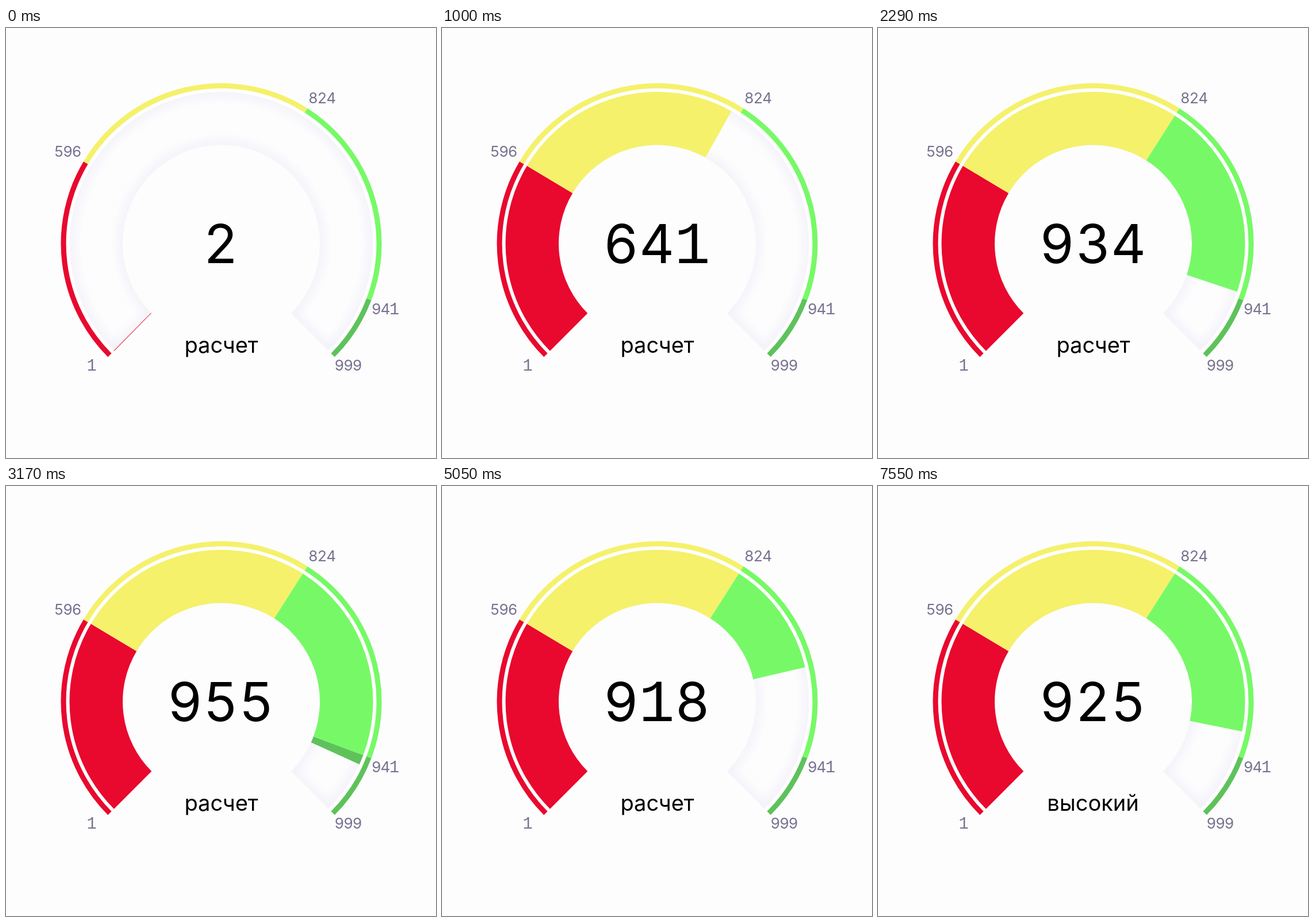
Animation, 748 px wide and 748 px high, one loop 7.59 s. Source, as an HTML page:

```html
<!DOCTYPE html>
<html lang="ru">
<head>
<meta charset="utf-8">
<title>Gauge</title>
<style>
  html, body { margin: 0; width: 100%; height: 100%; overflow: hidden; background: #fdfdfd; }
  svg { display: block; width: 748px; height: 748px; }
  text { font-family: Inter, "Noto Sans", sans-serif; text-anchor: middle; }
  .footed { font-family: "Liberation Mono", monospace; }
  .mark { fill: #77728f; }
  .status { font-size: 38px; }
</style>
</head>
<body>
<svg viewBox="0 0 748 748">
  <defs>
    <filter id="soft" x="-10%" y="-10%" width="120%" height="120%">
      <feGaussianBlur stdDeviation="9"/>
    </filter>
    <clipPath id="inside"><path class="band"/></clipPath>
  </defs>
  <path class="band" fill="#fdfdfe"/>
  <g clip-path="url(#inside)">
    <path class="band" fill="none" stroke="#ebebf7" stroke-width="11" filter="url(#soft)"/>
  </g>
  <g id="arcs" fill="none"></g>
  <g id="marks"></g>
  <text id="value"></text>
  <text id="busy" class="status" x="374.5" y="564.5">расчет</text>
  <text id="done" class="status" x="374" y="564.5">высокий</text>
</svg>
<script>
const LOOP = 7590, CX = 374.5, CY = 375, START = -135, END = 135;
const INNER = 171.5, OUTER = 264;
const zones = [
  { from: START, to: -59.2, color: '#e9082e' },
  { from: -59.2, to: 32.5, color: '#f5f16b' },
  { from: 32.5, to: 110.7, color: '#77f967' },
  { from: 110.7, to: END, color: '#5ec25b' }
];
const marks = [['1', 149, 596], ['596', 107.5, 224], ['824', 550, 131], ['941', 660, 498], ['999', 595.5, 596]];

const $ = id => document.getElementById(id);

function add(parent, name, attrs) {
  const node = document.createElementNS('http://www.w3.org/2000/svg', name);
  for (const key in attrs) node.setAttribute(key, attrs[key]);
  return parent.appendChild(node);
}

// Angles are in degrees, clockwise from the top.
function point(r, deg) {
  const a = deg * Math.PI / 180;
  return `${(CX + r * Math.sin(a)).toFixed(2)} ${(CY - r * Math.cos(a)).toFixed(2)}`;
}

function arc(r, from, to) {
  const large = Math.abs(to - from) > 180 ? 1 : 0;
  return `${point(r, from)} A${r} ${r} 0 ${large} ${to > from ? 1 : 0} ${point(r, to)}`;
}

// Evenly spaced digits; the one has a foot.
function setDigits(node, str, x, y, size, step) {
  node.textContent = '';
  [...str].forEach((digit, i) => {
    const footed = digit === '1';
    const part = add(node, 'tspan', {
      x: x + (i - (str.length - 1) / 2) * step, y,
      'font-size': footed ? size * 1.1 : size,
      class: footed ? 'footed' : ''
    });
    part.textContent = digit;
  });
}

const clamp = p => Math.min(1, Math.max(0, p));
const ramp = (t, a, b) => clamp((t - a) / (b - a));
const swing = (t, a, b) => (1 - Math.cos(Math.PI * ramp(t, a, b))) / 2;
const rise = (t, power) => 1 - (1 - ramp(t, 0, 3100)) ** power;

const needleAt = t => START + 249.7 * rise(t, 2.75) - 46 * swing(t, 3100, 4618) + 32.65 * swing(t, 4618, 5911);
const valueAt = t => Math.round(1 + 954 * rise(t, 2.85) - 40 * swing(t, 3720, 4900) + 10 * swing(t, 4900, 5320));

const band = `M${arc(OUTER, START, END)} L${arc(INNER, END, START)} Z`;
document.querySelectorAll('.band').forEach(path => path.setAttribute('d', band));

add($('arcs'), 'path', { d: 'M' + arc(267, START, END), stroke: '#fff', 'stroke-width': 6 });
for (const zone of zones) {
  add($('arcs'), 'path', { d: 'M' + arc(274.5, zone.from, zone.to), stroke: zone.color, 'stroke-width': 9 });
  zone.fill = add($('arcs'), 'path', { stroke: zone.color, 'stroke-width': OUTER - INNER });
}
for (const [str, x, y] of marks) {
  setDigits(add($('marks'), 'text', { class: 'mark' }), str, x, y, 26, 15.6);
}

let shown;
function draw(t) {
  const needle = needleAt(t), value = valueAt(t);
  for (const { from, to, fill } of zones) {
    const tip = Math.min(to, needle);
    fill.setAttribute('d', tip > from + 0.01 ? 'M' + arc((INNER + OUTER) / 2, from, tip) : '');
  }
  if (value !== shown) {
    setDigits($('value'), String(value), 373.5, 408.5, 94, 62);
    shown = value;
  }
  $('busy').style.opacity = 1 - ramp(t, 5710, 6130);
  $('done').style.opacity = ramp(t, 6170, 6590);
}

const began = performance.now();
function tick() {
  draw((performance.now() - began) % LOOP);
  requestAnimationFrame(tick);
}
draw(0);
requestAnimationFrame(tick);
</script>
</body>
</html>
```
